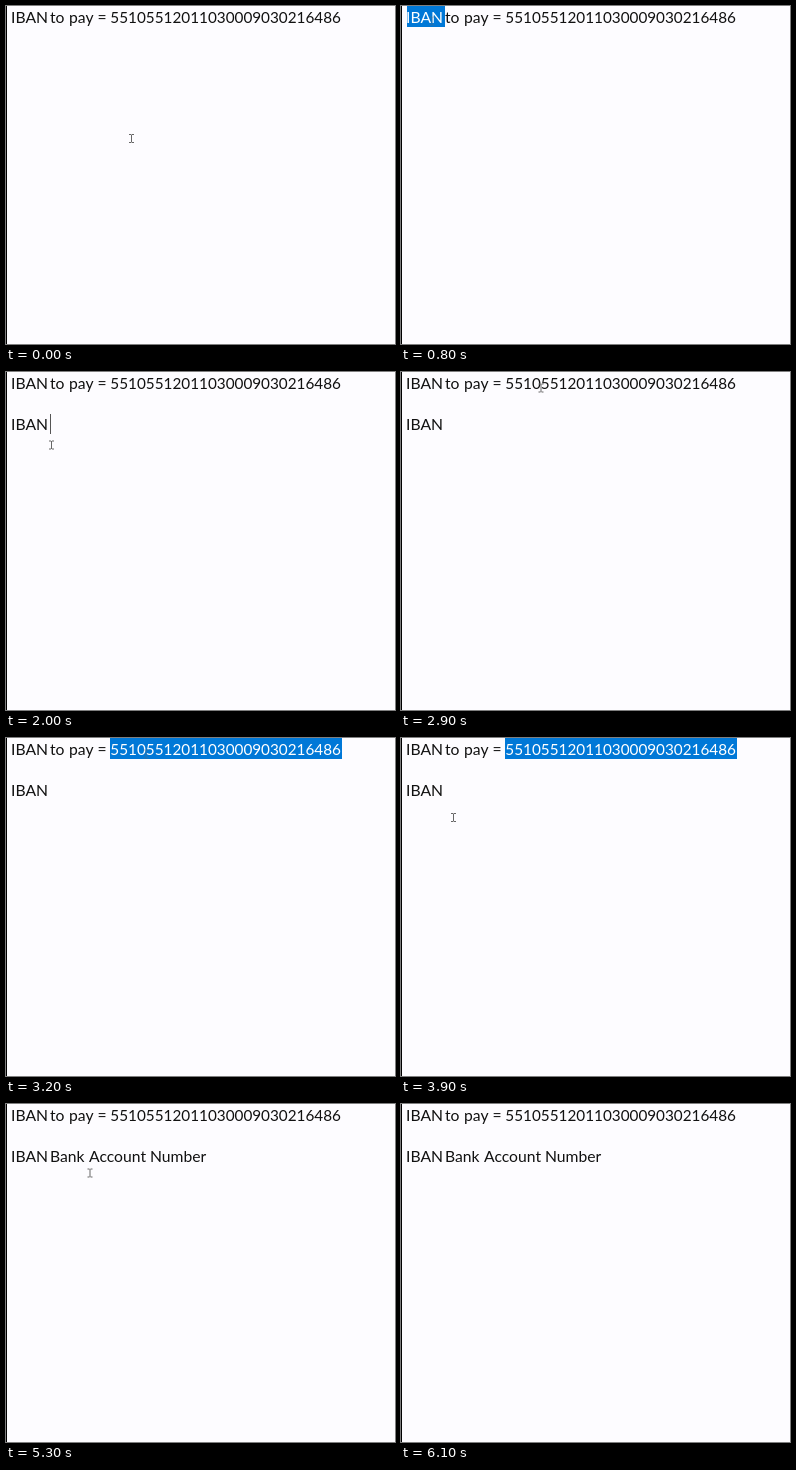
Write an HTML page that moves like this. It is 389 by 338 pixels and loops after 6200 ms.

```html
<!DOCTYPE html>
<html lang="en">
<head>
<meta charset="utf-8">
<title>Copy and paste</title>
<style>
  html, body { margin: 0; width: 100%; height: 100%; overflow: hidden; background: #fdfcff; }
  svg { display: block; width: 389px; height: 338px; }
  text { font: 15.7px Lato, Inter, sans-serif; fill: #111; }
  #digits { font-size: 15.3px; }
  .selected { fill: #fff; }
  .mark { fill: #0078d7; }
</style>
</head>
<body>
<svg viewBox="0 0 389 338">
  <rect width="389" height="338" fill="#fdfcff"/>
  <rect width="1" height="338"/>
  <rect id="wordMark" class="mark" x="6" width="38" height="21"/>
  <rect id="digitMark" class="mark" x="104" width="232" height="21"/>
  <text id="word" x="5" y="17">IBAN</text>
  <text y="17"><tspan x="44">to</tspan> <tspan x="63">pay</tspan> <tspan x="91.5">=</tspan></text>
  <text id="digits" x="104.3" y="17">55105512011030009030216486</text>
  <text id="paste1" x="5" y="58">IBAN</text>
  <text id="paste2" y="58"><tspan x="44">Bank</tspan> <tspan x="83">Account</tspan> <tspan x="144">Number</tspan></text>
  <rect id="caret" y="42" width="1" height="20" fill="#555"/>
  <path id="pointer" d="M-2.5-4h2M.5-4h2M-2.5 4h2M.5 4h2M0-4V4" fill="none" stroke="#666"/>
</svg>
<script>
const LOOP = 6200, STEP = 100;
const $ = id => document.getElementById(id);

// pointer path: time, x, y
const path = [
  [0, 125.5, 132.5], [500, 31, 15], [800, 31, 15], [1400, 45.5, 73],
  [2300, 45.5, 73], [2700, 140, 16], [3500, 140, 16], [3800, 58, 87],
  [3900, 52.5, 79.5], [4200, 49, 66], [4600, 76.5, 60.5], [4900, 76.5, 60.5],
  [5300, 84, 69], [5900, 84, 69], [6000, 104, 164]
];

function pointerAt(t) {
  const i = path.findIndex(p => p[0] > t);
  if (i < 0) return path[path.length - 1].slice(1);
  const [a, b] = [path[i - 1], path[i]];
  const u = (t - a[0]) / (b[0] - a[0]);
  const ease = u * u * (3 - 2 * u);
  return [1, 2].map(k => a[k] + (b[k] - a[k]) * ease);
}

const within = (t, from, to) => t >= from && t < to;
const show = (id, on) => $(id).setAttribute("visibility", on ? "visible" : "hidden");

function select(id, on) {
  show(id + "Mark", on);
  $(id === "digit" ? "digits" : id).classList.toggle("selected", on);
}

function caretX(t) {
  if (within(t, 1500, 1900)) return 6;
  if (within(t, 1900, 2500) || within(t, 4200, 4400)) return 44;
  if (within(t, 4400, 5000) || within(t, 5500, 6000)) return 201.5;
  return null;
}

function draw(now) {
  const t = Math.floor(now % LOOP / STEP) * STEP;
  select("word", within(t, 600, 1500));
  select("digit", within(t, 3000, 4200));
  show("paste1", t >= 1900);
  show("paste2", t >= 4400);

  const x = caretX(t);
  show("caret", x !== null);
  if (x !== null) $("caret").setAttribute("x", x);

  const marked = within(t, 600, 1000) || within(t, 3000, 3600);
  show("pointer", t < 6100);
  $("pointer").setAttribute("opacity", marked ? 0.45 : 1);
  $("pointer").setAttribute("transform", `translate(${pointerAt(t)})`);
}

const start = performance.now();
function tick() {
  draw(performance.now() - start);
  requestAnimationFrame(tick);
}
tick();
</script>
</body>
</html>
```
